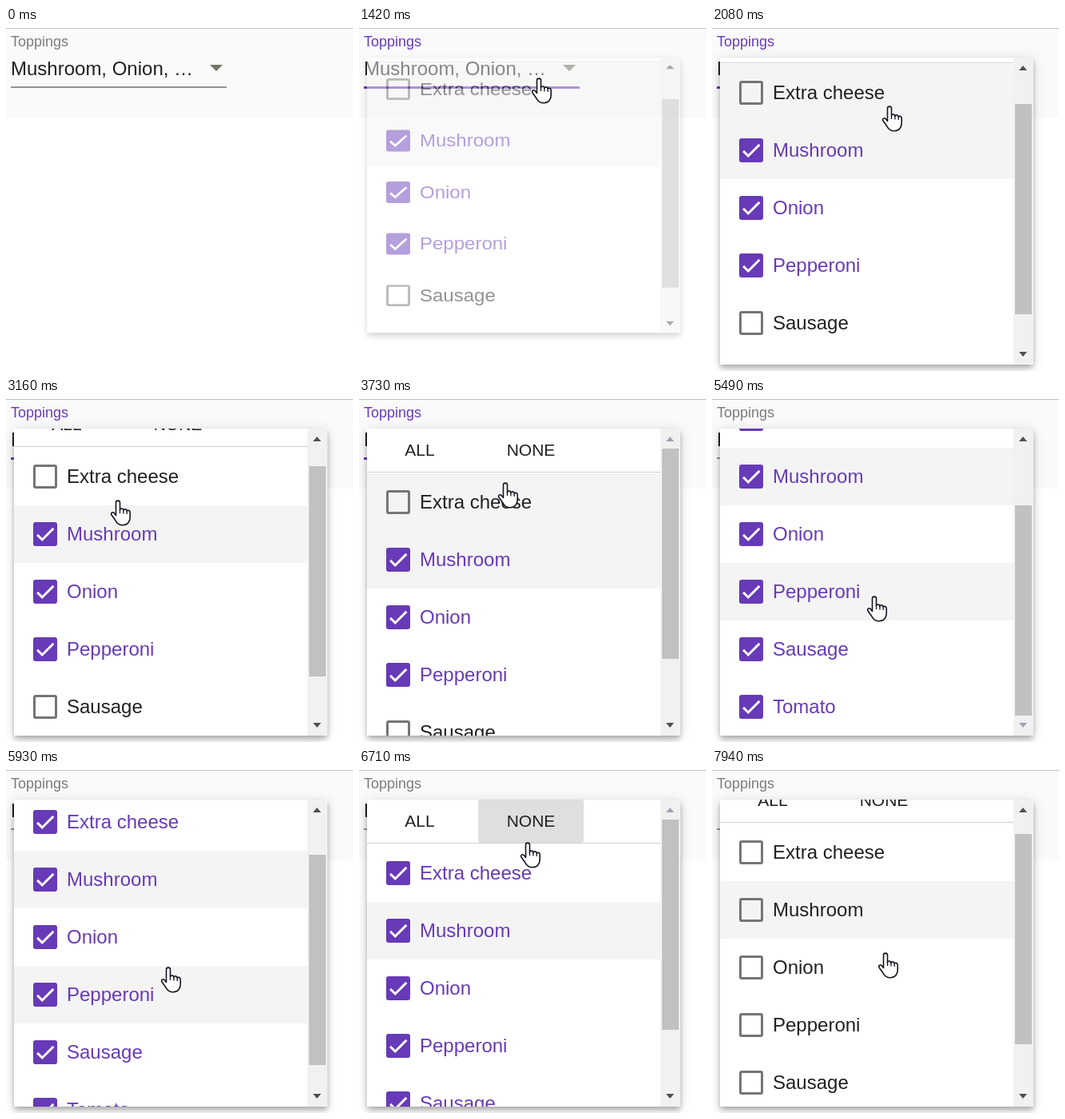
Animation, 434 px wide and 429 px high, one loop 8000 ms. Source, as an HTML page:

```html
<!DOCTYPE html>
<html lang="en">
<head>
<meta charset="utf-8">
<title>Toppings select</title>
<style>
  html, body { margin: 0; width: 100%; height: 100%; overflow: hidden; background: #fff; }
  body { position: relative; font: 24px "Liberation Sans", Arial, sans-serif; color: #212121; }
  div, svg { position: absolute; box-sizing: border-box; }
  #bar { left: 0; top: 0; width: 100%; height: 112px; background: #fafafa; border-top: 1px solid #c4c4c4; }
  #label { left: 6px; top: 6px; font-size: 18px; line-height: 22px; color: #7b7b7b; }
  #value { left: 6px; top: 36px; width: 232px; line-height: 30px; white-space: nowrap;
           overflow: hidden; text-overflow: ellipsis; }
  #arrow { left: 255px; top: 46px; border: solid transparent; border-width: 8px 8px 0; border-top-color: #757568; }
  #line { left: 6px; top: 73px; width: 270px; height: 2px; background: #949494; }
  .focus #label { color: #673ab7; }
  .focus #line { height: 3px; background: #673ab7; }
  #panel { left: 10px; top: 37px; width: 392px; height: 384px; background: #fff; transform-origin: 50% 0;
           box-shadow: 0 3px 6px -1px rgba(0,0,0,.2), 0 6px 8px rgba(0,0,0,.14), 0 2px 15px rgba(0,0,0,.12); }
  #view { left: 0; top: 0; width: 367px; height: 384px; overflow: hidden; }
  #list { left: 0; top: 0; width: 367px; height: 488px; }
  #head { left: 0; top: 0; width: 100%; height: 55px; border-bottom: 1px solid #d0d0d0; }
  .btn { top: 0; width: 132px; height: 54px; border-radius: 3px; font-size: 21px; line-height: 54px; text-align: center; }
  #none { left: 139px; }
  .row { left: 0; width: 100%; height: 72px; padding-left: 66px; line-height: 72px; }
  .row.lit { background: #f4f4f4; }
  .row.on { color: #673ab7; }
  .box { left: 24px; top: 21px; width: 30px; height: 30px; border: 3px solid #757575; border-radius: 3px; }
  .on .box { border: 0; background: #673ab7; }
  .tick { left: 0; top: 0; display: none; fill: none; stroke: #fff; stroke-width: 2.3; }
  .on .tick { display: block; }
  #rail { left: 367px; top: 0; width: 25px; height: 384px; background: #f1f1f1; }
  #thumb { left: 2px; top: 25px; width: 21px; height: 263px; background: #c1c1c1; }
  .tip { left: 7px; border: 0 solid transparent; border-left-width: 5.5px; border-right-width: 5.5px; color: #505050; }
  .tip.off { color: #a6a0b2; }
  #up { top: 10px; border-bottom: 6px solid; }
  #down { top: 368px; border-top: 6px solid; }
  #up, #down { border-left-color: transparent; border-right-color: transparent; }
  #cursor { left: 0; top: 0; overflow: visible; fill: #fff; stroke: #151520; stroke-width: 1.6; stroke-linejoin: round; }
</style>
</head>
<body>
<div id="bar"></div>
<div id="field">
  <div id="label">Toppings</div>
  <div id="value"></div>
  <div id="arrow"></div>
  <div id="line"></div>
</div>
<div id="panel">
  <div id="view">
    <div id="list">
      <div id="head">
        <div class="btn" id="all">ALL</div>
        <div class="btn" id="none">NONE</div>
      </div>
    </div>
  </div>
  <div id="rail">
    <div id="thumb"></div>
    <div class="tip" id="up"></div>
    <div class="tip" id="down"></div>
  </div>
</div>
<svg id="cursor" width="28" height="36">
  <path id="pointer" d="M0 0V25L6 19.5L10 28.5L14 26.5L10 18H18Z"/>
  <g id="hand" transform="translate(-9.2 0)">
    <path d="M6.7 19.5V3.6a2.5 2.5 0 0 1 5 0V13c0-2.8 4.4-2.8 4.4 .4c.3-2.4 4.2-2 4.3 .8c.6-1.6 4-1.2 4 1.8V22
             c0 5-3 9.8-9 9.8c-5.6 0-7.6-2.6-9.4-6L1.2 19c-1.3-2.6 1.4-4.4 3.4-2.2Z"/>
    <path fill="none" stroke-width="1.3" d="M11.7 12V17M16.1 13V17.5M20.4 14V18"/>
  </g>
</svg>
<script>
const LOOP = 8000;
const names = ['Extra cheese', 'Mushroom', 'Onion', 'Pepperoni', 'Sausage', 'Tomato'];
const $ = id => document.getElementById(id);

// The screen refreshes in bursts: [first, last, count]
const bursts = [[300, 520, 3], [740, 1520, 8], [1640, 2080, 5], [2630, 2730, 2], [3160, 3380, 3],
  [3730, 4490, 8], [4610, 5390, 8], [5490, 5490, 1], [5710, 6170, 5], [6390, 6710, 4],
  [6830, 7170, 4], [7270, 7710, 5], [7940, 7940, 1]];
const ticks = [0];
for (const [a, b, n] of bursts)
  for (let i = 0; i < n; i++)
    ticks.push(a + Math.floor((b - a) * i / Math.max(1, n - 1) / 10) * 10);

// Pointer path: time, x, y
const path = [[300, 341, 400], [410, 285, 270], [520, 221, 150], [740, 222, 118], [960, 225, 62],
  [1640, 225, 62], [2080, 222, 97], [2630, 106, 80], [2730, 140, 126], [3380, 140, 126],
  [3730, 183, 104], [3840, 205, 82], [4060, 185, 66], [4270, 120, 64], [4490, 120, 64],
  [4610, 125, 110], [4830, 171, 204], [5050, 130, 180], [5280, 97, 160], [5390, 97, 160],
  [5490, 203, 246], [6170, 203, 246], [6390, 206, 160], [6500, 211, 86], [6710, 211, 90],
  [6830, 211, 72], [7170, 211, 72], [7270, 180, 75], [7380, 120, 96], [7490, 117, 150],
  [7600, 170, 200], [7710, 217, 228]];
const scrolls = [[0, 48], [3050, 48], [3380, 0], [4830, 0], [5390, 104], [5600, 104],
  [6170, 0], [7830, 0], [7940, 26]];

const clamp = v => Math.min(1, Math.max(0, v));

function along(keys, t, k = 1) {
  const i = keys.findIndex(p => p[0] > t);
  if (i < 0) return keys[keys.length - 1][k];
  if (i === 0) return keys[0][k];
  const a = keys[i - 1], b = keys[i];
  return a[k] + (b[k] - a[k]) * (t - a[0]) / (b[0] - a[0]);
}

// Hover overlay with a 200 ms fade at both ends
const hover = (t, a, b) => Math.min(clamp((t - a) / 200), 1 - clamp((t - b) / 200));
const shade = alpha => `rgba(0,0,0,${0.125 * alpha})`;

const rows = names.map((name, i) => {
  const row = document.createElement('div');
  row.className = 'row';
  row.style.top = 56 + 72 * i + 'px';
  row.innerHTML = '<div class="box"><svg class="tick" width="30" height="30" viewBox="0 0 24 24">' +
    '<path d="M4.1 12.7L9 17.6L20.3 6.3"/></svg></div>' + name;
  $('list').append(row);
  return row;
});

function draw(t) {
  const x = along(path, t, 1), y = along(path, t, 2);
  const scroll = along(scrolls, t);
  const picked = names.map((_, i) => t < 4380 ? i > 0 && i < 4 : t < 6900);

  $('field').className = t >= 1250 && t < 4380 ? 'focus' : '';
  $('value').textContent = names.filter((_, i) => picked[i]).join(', ');
  if (t < 4380) $('value').textContent = 'Mushroom, Onion, …';

  const open = 1 - (1 - clamp((t - 1330) / 250)) ** 2;
  $('panel').style.opacity = open;
  $('panel').style.transform = `scaleY(${0.8 + 0.2 * open})`;

  // The row under the pointer is noticed a moment after scrolling
  const over = Math.floor((y - 93 + along(scrolls, t - 130)) / 72);
  rows.forEach((row, i) => {
    row.classList.toggle('on', picked[i]);
    row.classList.toggle('lit', i === 1 || i === over);
  });
  $('all').style.background = shade(hover(t, 4150, 4660));
  $('none').style.background = shade(Math.max(hover(t, 3780, 4150), hover(t, 6430, 7300)));

  $('list').style.top = -scroll + 'px';
  $('thumb').style.top = 25 + scroll * 0.683 + 'px';
  $('up').classList.toggle('off', scroll <= 0);
  $('down').classList.toggle('off', scroll >= 104);

  $('cursor').style.display = t < 300 ? 'none' : '';
  $('cursor').style.transform = `translate(${x}px,${y}px)`;
  $('pointer').style.display = t < 850 ? '' : 'none';
  $('hand').style.display = t < 850 ? 'none' : '';
}

const start = performance.now();
let last = -1;
function frame() {
  const now = Math.max(0, performance.now() - start) % LOOP;
  const t = ticks.filter(k => k <= now).pop();
  if (t !== last) draw(last = t);
  requestAnimationFrame(frame);
}
frame();
</script>
</body>
</html>
```
